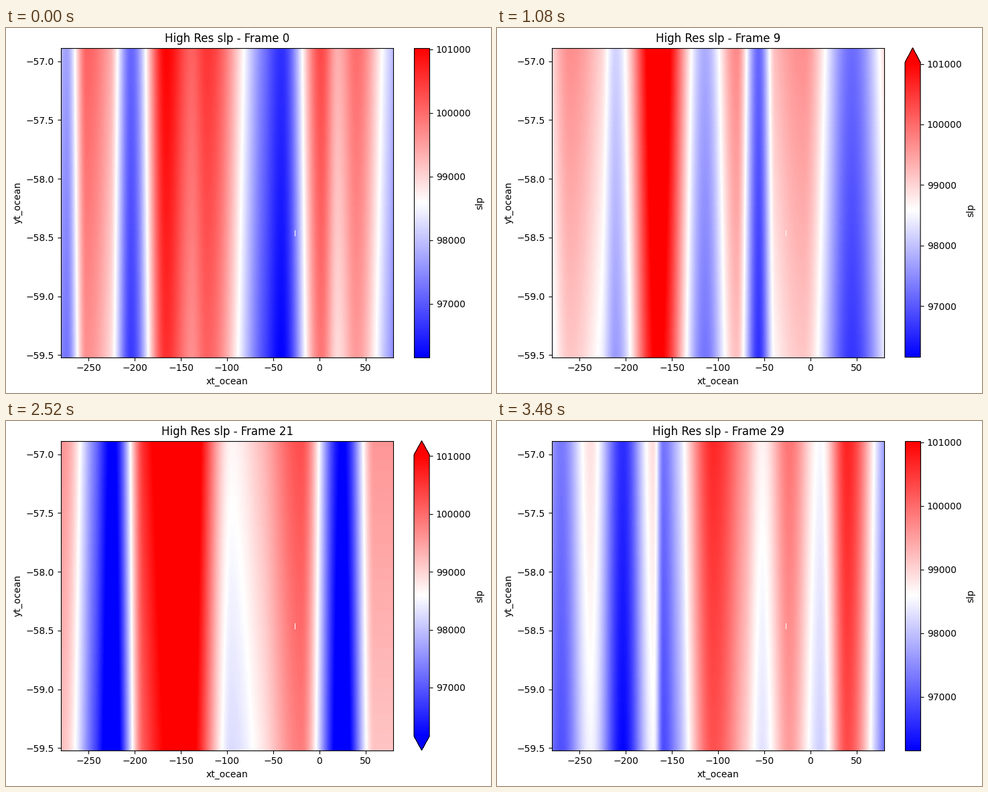
Write a matplotlib script that moves like this. It is 724x545 px and loops after 3.6 s.

```python
import matplotlib.pyplot as plt
import numpy as np
from matplotlib.animation import FuncAnimation
from matplotlib.cm import ScalarMappable
from matplotlib.colors import Normalize

W, H, DPI = 724, 545, 100
FRAMES, LOOP = 30, 3600
ROWS, COLS = 51, 496
EXTENT = (-280, 80, -59.518, -56.886)
MID, HALF = 98590, 2431
TOP = 29.6

lon = -280 + 360 * (np.arange(COLS) + 0.5) / COLS
south = ((np.arange(ROWS) + 0.5) / ROWS - 0.5)[:, None]


def waves(*crests):
    """Periodic monotone cubic through (longitude, anomaly) crests and troughs."""
    x, v = np.array(crests).T
    x = np.concatenate([x - 360, x, x + 360])
    v = np.tile(v, 3)
    h = np.diff(x)
    d = np.diff(v) / h
    a, b = d[:-1], d[1:]
    m = np.zeros_like(v)
    ok = a * b > 0
    m[1:-1][ok] = 2 * a[ok] * b[ok] / (a[ok] + b[ok])
    i = np.searchsorted(x, lon, side="right") - 1
    t = (lon - x[i]) / h[i]
    s = 1 - t
    return (s * s * ((1 + 2 * t) * v[i] + t * h[i] * m[i])
            + t * t * ((3 - 2 * t) * v[i + 1] - s * h[i] * m[i + 1]))


# step: (fall in pressure from north to south, wave train)
maps = {
    0: (0.18, waves((-274, -.45), (-252, .52), (-227, .25), (-204, -.68),
                    (-166, .9), (-138, .53), (-122, .7), (-60, -.62),
                    (-41, -.9), (2, .62), (20, .23), (40, .48), (75, -.25))),
    5: (0.25, waves((-256, -.42), (-206, .86), (-168, .12), (-133, .36),
                    (-107, -.63), (-69, 1.2), (-40, .2), (-24, .05),
                    (24, -.26), (57, .45))),
    9: (0.22, waves((-260, .33), (-227, .07), (-211, -.28), (-165, 1.15),
                    (-114, -.43), (-80, .35), (-56, -.7), (-38, .15),
                    (-8, .33), (45, -.68))),
    16: (0.2, waves((-264, .18), (-240, -.85), (-219, -.82), (-187, .6),
                    (-165, .74), (-140, 1.2), (-109, 1.2), (-78, -.27),
                    (-55, -.8), (-23, .28), (-1, -.1), (28, -.55), (54, .37))),
    21: (0.18, waves((-278, .32), (-244, -.6), (-224, -1.12), (-190, .75),
                     (-145, 1.25), (-95, -.05), (-64, .16), (-20, .6),
                     (25, -1.1), (60, .32))),
    26: (0.08, waves((-277, .52), (-248, -.22), (-236, -.05), (-222, -.21),
                     (-207, -.08), (-181, -.57), (-125, .8), (-95, -.18),
                     (-67, -.18), (-42, .35), (-3, .8), (34, -.9))),
    29: (0.16, waves((-270, -.6), (-238, .04), (-203, -.9), (-170, .05),
                     (-159, -.62), (-145, -.33), (-105, .76), (-71, .3),
                     (-52, -.03), (-23, .46), (11, -.1), (40, .78))),
}
steps = list(maps)


def moved(train, shift):
    return np.interp(lon - shift, lon, train, period=360)


def best_drift(p, q):
    """Eastward shift in degrees that best carries one train onto the next."""
    return max(range(0, 75), key=lambda s: moved(p, s) @ q)


drift = [best_drift(maps[a][1], maps[b][1]) for a, b in zip(steps, steps[1:])]


def field(n):
    k = min(np.searchsorted(steps, n, side="right"), len(drift)) - 1
    a, b = steps[k], steps[k + 1]
    w = (n - a) / (b - a)
    (fall_a, p), (fall_b, q) = maps[a], maps[b]
    train = ((1 - w) * moved(p, drift[k] * w)
             + w * moved(q, -drift[k] * (1 - w)))
    return train - ((1 - w) * fall_a + w * fall_b) * south


def add_axes(x, y, w, h):
    return fig.add_axes((x / W, 1 - (y + h) / H, w / W, h / H))


fig = plt.figure(figsize=(W / DPI, H / DPI), dpi=DPI, facecolor="white")
ax = add_axes(82, TOP, 496, 462)
norm = Normalize(MID - HALF, MID + HALF)
im = ax.imshow(np.zeros((ROWS, COLS)), cmap="bwr", norm=norm, extent=EXTENT,
               aspect="auto", interpolation="nearest")
ax.set(xlabel="xt_ocean", ylabel="yt_ocean")
title = ax.set_title("")

bars = {}
for extend in ("neither", "min", "max", "both"):
    bar = fig.colorbar(ScalarMappable(norm, "bwr"), extend=extend,
                       cax=add_axes(609, TOP, 23.1, 462))
    bar.set_label("slp")
    bars[extend] = bar.ax


def update(n):
    v = field(n)
    under, over = v.min() < -1, v.max() > 1
    extend = ("both" if under and over else "min" if under
              else "max" if over else "neither")
    for name, cax in bars.items():
        cax.set_visible(name == extend)
    v[30, 349] = np.nan     # missing cell
    im.set_data(MID + HALF * v)
    title.set_text(f"High Res slp - Frame {n}")
    return [im, title]


anim = FuncAnimation(fig, update, frames=FRAMES, interval=LOOP / FRAMES,
                     repeat=True, repeat_delay=0, blit=False)
plt.show()
```
